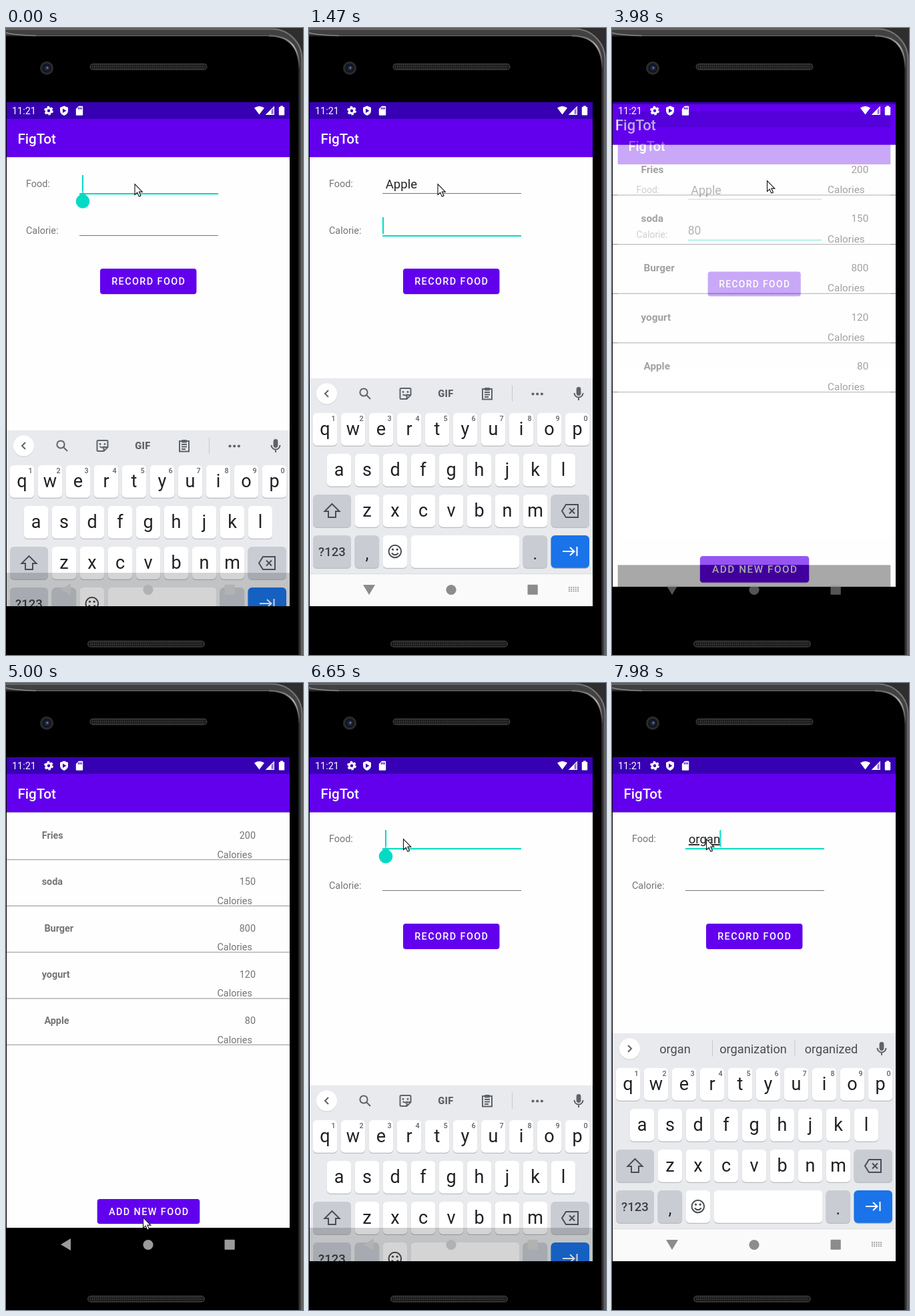
An HTML page for the animation above (8 s loop, 445 by 938 pixels).

```html
<!DOCTYPE html>
<html lang="en">
<head>
<meta charset="utf-8">
<title>Food log</title>
<style>
html, body { margin: 0; width: 100%; height: 100%; overflow: hidden; background: #000; }
svg { display: block; width: 445px; height: 938px; font-family: Roboto, sans-serif; }
.mid { text-anchor: middle; }
.med { font-weight: 500; }
.line { fill: none; stroke: currentColor; stroke-width: 2; }
#food { text-decoration-skip-ink: none; }
</style>
</head>
<body>
<svg id="stage" viewBox="0 0 445 938" xmlns="http://www.w3.org/2000/svg"></svg>
<script>
const LOOP = 8000;
const TEAL = '#03dac5', PURPLE = '#6200ee';

const rect = (x, y, w, h, fill, rx = 0, extra = '') =>
  `<rect x="${x}" y="${y}" width="${w}" height="${h}" fill="${fill}" rx="${rx}" ${extra}/>`;
const text = (x, y, size, fill, str, extra = '') =>
  `<text x="${x}" y="${y}" font-size="${size}" fill="${fill}" ${extra}>${str}</text>`;
const circle = (x, y, r, fill, extra = '') =>
  `<circle cx="${x}" cy="${y}" r="${r}" fill="${fill}" ${extra}/>`;
const path = (d, extra = 'class="line"') => `<path d="${d}" ${extra}/>`;
const at = (x, y, body) => `<g transform="translate(${x} ${y})">${body}</g>`;

function phone() {
  const speaker = (x, y) => rect(x, y, 176, 10, '#3a3a3a', 5) +
    rect(x + 1.5, y + 1.5, 173, 7, '#161616', 3.5) + rect(x + 3, y + 2, 170, 6, 'url(#mesh)', 3);
  return rect(0, 0, 445, 938, '#2e2e2e') +
    rect(-60, 1.5, 503.5, 1000, '#414141', 45, 'stroke="#747474" stroke-width="2"') +
    rect(-60, 11.5, 499, 1000, '#000', 39, 'stroke="#242424" stroke-width="2"') +
    path('M45 11.5H400', 'fill="none" stroke="#777" stroke-width="1"') +
    path('M0 7Q12 11 45 11.5', 'fill="none" stroke="#8a8a8a" stroke-width="1.5"') +
    path('M394 11.500Q439 11.500 439.500 60', 'fill="none" stroke="url(#shine)" stroke-width="2.500"') +
    speaker(125.5, 53) + speaker(122, 916.5) +
    circle(61, 60, 10, '#2b2b2e') + circle(61, 60, 7, '#15161d') +
    circle(61.5, 60, 3.6, '#202c4e') + circle(62, 59.5, 1.2, '#7189b5');
}

// Window backdrop shared by both screens
function page(body) {
  return rect(1, 815, 424, 50, '#000') + rect(1, 111, 424, 25, '#3700b3') +
    rect(1, 136, 424, 57.5, PURPLE) + rect(1, 193.5, 424, 621.5, '#fefefe') +
    text(17.5, 173, 20.6, '#fff', 'FigTot', 'class="med"') + body;
}

function button(x, y, w, h, label, id) {
  return rect(x, y + 1, w, h, '#000', 4, 'opacity=".12"') + rect(x, y, w, h, PURPLE, 4) +
    `<ellipse id="${id}" cx="${x + w / 2}" cy="${y + h / 2}" ry="${h / 2}" fill="#fff"/>` +
    text(x + 17.2, y + h / 2 + 5.2, 14.4, '#fff', label, 'class="med" letter-spacing="1.42"');
}

function form() {
  return page(
    text(30, 238, 14.4, '#757575', 'Food:') + text(30, 307.8, 14.4, '#757575', 'Calorie:') +
    '<rect id="foodLine" x="110" width="208"/><rect id="calLine" x="110" width="208"/>' +
    text(114.8, 240, 18.5, '#212121', '', 'id="food"') +
    text(110, 302.8, 18.1, '#212121', '', 'id="cal"') +
    rect(0, 220, 2, 25, TEAL, 0, 'id="foodCaret"') + rect(0, 283, 2, 25, TEAL, 0, 'id="calCaret"') +
    path('M115 245.2l7.3 7a10.3 10.3 0 1 1-14.6 0z', `id="handle" fill="${TEAL}"`) +
    button(141, 360, 144.4, 38, 'RECORD FOOD', 'ripRecord'));
}

function list() {
  const rows = [['Fries', 200, 0], ['soda', 150, 0], ['Burger', 800, 1], ['yogurt', 120, 0], ['Apple', 80, 1]];
  return page(rows.map(([name, n, pad], i) => at(0, i * 69.25,
    text(53.7 + pad * 3.7, 233, 14.4, '#747474', name, 'font-weight="700"') +
    text(374, 233, 14.4, '#747474', n, 'text-anchor="end"') +
    text(316.5, 261.6, 14.4, '#747474', 'Calories') + rect(1, 263.7, 424, 1.1, '#9a9a9a'))).join('') +
    button(136.7, 771.9, 153.6, 37, 'ADD NEW FOOD', 'ripAdd'));
}

function keyboard() {
  const key = (x, y, w, fill = '#fff') => rect(x, y + 1, w, 49, '#b9bcc1', 6) + rect(x, y, w, 48.7, fill, 6);
  const GREY = '#c9ccd3', INK = '#202124';
  const row = (letters, x0, y, hints) => [...letters].map((c, i) => {
    const x = x0 + i * 42;
    return key(x - 18.3, y, 36.6) + text(x, y + 33, 27, INK, c, 'class="mid"') +
      (hints ? text(x + 12.5, y + 12.2, 10.8, '#5f6368', (i + 1) % 10, 'class="mid med"') : '');
  }).join('');
  const sep = x => rect(x, 535, 1, 24, '#c6c8cc');
  const dots = [0, 1, 2].map(i => circle(335.5 + i * 6.7, 547.5, 2.1, '#5f6368')).join('');
  const tools = at(84, 547, circle(-2, -2, 5.6, 'none', 'class="line"') + path('M2.5 2.5L8 8')) +
    at(144.5, 547, path('M-6.5-8H6.5Q8-8 8-6.5V2L2 8H-6.5Q-8 8-8 6.5V-6.5Q-8-8-6.5-8zM8 2H2V8M-4 1Q-1 4 3 1') +
      circle(-3.5, -2.5, 1.4, '#5f6368') + circle(3.5, -2.5, 1.4, '#5f6368')) +
    text(205, 552.3, 14.5, '#5f6368', 'GIF', 'class="mid" font-weight="900" letter-spacing=".4"') +
    at(267, 547, path('M-7-7H7V8.5H-7zM-4-2H4M-4 1.5H4M-4 5H2') + rect(-4, -9, 8, 4.5, '#5f6368', 1)) +
    sep(304) + dots;
  const words = [94.5, 211.5, 328.5].map(x => text(x, 554, 18.2, '#4a4d52', '', 'class="mid word"')).join('') +
    sep(150) + sep(273.5);
  let pad = '';
  for (let i = 0; i < 15; i++) pad += rect(389 + i % 5 * 3.3, 836 + Math.floor(i / 5) * 2.8, 1.8, 1.6, '#8c8c8c');
  return rect(1, 524, 424, 341, '#e8eaed') + rect(1, 816, 424, 49, '#fafafa') + rect(1, 816, 424, 1.2, '#dcdee0') +
    `<g color="#5f6368"><g id="tools">${tools}</g><g id="words">${words}</g>` +
    circle(26.5, 548, 15.8, '#d3d5d8') + circle(26.5, 547, 15.6, '#fff') +
    at(26.5, 547, path('M2.5-5L-2.5 0L2.5 5', 'id="chev" class="line"')) +
    at(404, 547, rect(-3.4, -10, 6.8, 13, '#5f6368', 3.4) + path('M-6.5-1a6.5 6.5 0 0 0 13 0M0 5.5V10')) + '</g>' +
    row('qwertyuiop', 24, 576, true) + row('asdfghjkl', 45, 637) + row('zxcvbnm', 87, 698) +
    key(6, 698, 57, GREY) + key(362.5, 698, 57.5, GREY) + key(6, 759, 57, GREY) + key(68.5, 759, 36.6, GREY) +
    key(110.5, 759, 36.6) + key(152.5, 759, 163) + key(320.5, 759, 36.6, GREY) + key(362.5, 759, 57.5, '#1a73e8') +
    '<g color="#4a4d52">' + at(34.5, 722, path('M0-10L11 1H5.5V10H-5.5V1H-11z')) +
    at(391, 722.5, path('M-6-9.5H12V9.5H-6L-12 0zM-1-4L7 4M7-4L-1 4')) +
    at(128.8, 783, circle(0, 0, 9.3, 'none', 'class="line"') + path('M-5 2.5Q0 8 5 2.5') +
      circle(-3.3, -2.8, 1.6, '#4a4d52') + circle(3.3, -2.8, 1.6, '#4a4d52')) + '</g>' +
    at(391, 783, `<g color="#fff">${path('M-11 0H6M0-6L6.5 0L0 6M10.5-7V7')}</g>`) +
    text(34.5, 789.8, 18.6, '#3c4043', '?123', 'class="mid med"') +
    text(87, 795, 25, INK, ',', 'class="mid"') + text(338.8, 795, 25, INK, '.', 'class="mid"') + pad;
}

function status() {
  return text(9, 129.2, 14.4, '#fff', '11:21') + '<g fill="#fff" color="#fff">' +
    at(64, 123.7, circle(0, 0, 3.8, 'none', 'stroke="#fff" stroke-width="3.2"') +
      circle(0, 0, 5.7, 'none', 'stroke="#fff" stroke-width="2.4" stroke-dasharray="3.2 2.77"')) +
    at(87, 123.7, path('M0-7.2L6-4.8V0Q6 5 0 7.4Q-6 5-6 0V-4.8z', '') +
      path('M-2-3.2L3.4 0L-2 3.2z', 'fill="#3700b3"')) +
    at(110, 123.7, path('M-1-7H4Q5.2-7 5.2-6V6Q5.2 7 4 7H-4Q-5.2 7-5.2 6V-2.8z', '') +
      [-1.6, .7, 3].map(x => rect(x - .6, -5, 1.3, 3, '#3700b3')).join('')) +
    path('M372 119.6Q379.5 114.5 387 119.6L379.5 129.5z', '') +
    path('M402 117V130H389z', 'opacity=".45"') + path('M397.5 121.5V130H389z', '') +
    path('M401.3 118.2V129.3H390.5z', 'fill="none" stroke="#fff" stroke-width="1.2"') +
    rect(408.8, 118, 8.4, 12.5, '#fff', 1) + rect(411, 116.5, 4, 2, '#fff') + '</g>';
}

function nav() {
  return at(90, 840, path('M-8 0L7-9V9z', 'id="back"')) + '<circle cx="213" cy="840.5" r="7.6"/>' +
    '<rect x="327.5" y="832.8" width="15.3" height="15" rx="1"/>';
}

const stage = document.getElementById('stage');
stage.innerHTML = `<defs>
  <clipPath id="screen"><rect x="1" y="111" width="424" height="754"/></clipPath>
  <pattern id="mesh" width="3" height="3" patternUnits="userSpaceOnUse"><circle cx="1" cy="1" r=".9" fill="#484848"/></pattern>
  <linearGradient id="shine" x2="0" y2="1"><stop stop-color="#666"/><stop offset=".3" stop-color="#aaa"/><stop offset="1" stop-color="#333"/></linearGradient>
</defs>${phone()}<g clip-path="url(#screen)">${rect(1, 111, 424, 754, '#000')}<g id="list">${list()}</g><g id="form">${form()}</g>
<g id="keys">${keyboard()}</g>${rect(1, 815, 424, 50, '#000', 0, 'id="shade"')}${status()}<g id="nav">${nav()}</g></g>
<path id="mouse" d="M0 0V16L3.7 12.6L6.3 18.6L9 17.5L6.4 11.6H11.3z" fill="#fff" stroke="#111" stroke-width="1.1"/>`;

const el = {};
stage.querySelectorAll('[id]').forEach(n => el[n.id] = n);
const words = [...stage.querySelectorAll('.word')];
const show = (n, on) => n.style.display = on ? '' : 'none';
const set = (n, attrs) => Object.entries(attrs).forEach(([k, v]) => n.setAttribute(k, v));
const clamp = v => Math.min(1, Math.max(0, v));

// The picture is refreshed in bursts: first time, last time, count
const BURSTS = [[120, 1030, 8], [1320, 1470, 2], [1840, 1840, 1], [2240, 2490, 2], [2920, 3850, 8],
  [3980, 5000, 9], [5120, 6110, 8], [6260, 7300, 9], [7430, 7980, 5]];
const ticks = [0];
for (const [a, b, n] of BURSTS)
  for (let i = 0; i < n; i++) ticks.push(n > 1 ? a + (b - a) * i / (n - 1) : a);
const snap = t => ticks.filter(k => k <= t + 12).pop();

function keyed(t, keys) {
  if (t <= keys[0][0]) return keys[0].slice(1);
  for (let i = 1; i < keys.length; i++) {
    const [a, b] = [keys[i - 1], keys[i]];
    if (t <= b[0]) return b.slice(1).map((v, j) => a[j + 1] + (v - a[j + 1]) * (t - a[0]) / (b[0] - a[0]));
  }
  return keys[keys.length - 1].slice(1);
}

// Fast out, extra slow in: two joined cubic curves
function glide(x) {
  x = clamp(x);
  const cubic = (u, a, b, c, d) => a * (1 - u) ** 3 + 3 * b * u * (1 - u) ** 2 + 3 * c * u * u * (1 - u) + d * u ** 3;
  const [cx, cy] = x < 1 / 6 ? [[0, .05, .1333, 1 / 6], [0, 0, .06, .4]] : [[1 / 6, .2083, .25, 1], [.4, .82, 1, 1]];
  let lo = 0, hi = 1;
  for (let i = 0; i < 24; i++) {
    const m = (lo + hi) / 2;
    if (cubic(m, ...cx) < x) lo = m; else hi = m;
  }
  return cubic(lo, ...cy);
}

const typed = (word, t, start, gap) => word.slice(0, Math.max(0, Math.floor((t - start) / gap) + 1));
const HINTS = {
  A: 'A And Also', Ap: 'A And Also', App: 'App Apps Apple', Appl: 'Appl Apple Apply', Apple: 'Apple Apples Appleseed',
  o: 'o of on', or: 'or orange order', org: 'org organic organize', orga: 'orga organic organized',
  organ: 'organ organization organized'
};
const MOUSE = [[2490, 193, 233.5], [2920, 200.5, 254.5], [3186, 232, 372], [3718, 233, 372], [3980, 232.5, 228.5],
  [4360, 232.5, 236], [4870, 206, 800], [5403, 204, 798], [5685, 115.5, 319.5], [5969, 136, 246], [6110, 141.5, 233.5]];
const CLOSE = 3915, OPEN = 5440;
const zoom = s => `translate(213 488) scale(${s}) translate(-213 -488)`;

function ripple(n, t, start) {
  const p = clamp((t - start) / 260), half = n === el.ripRecord ? 72 : 76;
  set(n, { rx: half * p, opacity: t < start ? 0 : .24 * (1 - clamp((t - start - 250) / 250)) });
}

function draw(time) {
  const t = snap(time), second = t > 5000;

  // Screen changes
  const age = t - (second ? OPEN : CLOSE);
  const p = glide(age / 400);
  set(el.list, {
    transform: zoom(second ? 1 + .05 * p : 1.1 - .1 * p),
    opacity: second ? 1 - .8 * clamp(age / 250) : 1
  });
  set(el.form, {
    transform: zoom(second ? .85 + .15 * p : 1 - .1 * p),
    opacity: second ? clamp((age - 35) / 50) : 1 - clamp((age - 35) / 45)
  });
  ripple(el.ripRecord, t, 3440);
  ripple(el.ripAdd, t, 5110);

  // Fields
  const food = second ? typed('organ', t, 7425, 137) : typed('Apple', t, 500, 130);
  const cal = second ? '' : t >= 2485 ? '80' : t >= 2235 ? '8' : '';
  const onFood = t < 1320 || t >= 6255, onCal = t >= 1320 && !second;
  el.food.textContent = food;
  el.cal.textContent = cal;
  el.food.setAttribute('text-decoration', onFood && food ? 'underline' : 'none');
  set(el.foodLine, onFood ? { y: 247, height: 2, fill: TEAL } : { y: 247, height: 1, fill: '#757575' });
  set(el.calLine, onCal ? { y: 310, height: 2, fill: TEAL } : { y: 310, height: 1, fill: '#757575' });
  set(el.foodCaret, { x: 114 + (food ? el.food.getComputedTextLength() : 0) });
  set(el.calCaret, { x: 110 + (cal ? el.cal.getComputedTextLength() : 0) });
  show(el.foodCaret, onFood);
  show(el.calCaret, onCal && (t < 1840 || t >= 2235 && t < 2915 || t >= 3440 && t < CLOSE));
  show(el.handle, onFood && !food);

  // Keyboard and navigation bar
  const up = t < CLOSE || t >= 6385, s = second ? t - 6650 : t;
  const [drop] = keyed(s, [[-260, 341], [-130, 250], [0, 78], [125, 10], [250, 0]]);
  const hints = t < 1465 || second ? HINTS[food] : '';
  show(el.keys, up);
  set(el.keys, { transform: `translate(0 ${drop})` });
  set(el.shade, { opacity: up ? clamp(drop / 459) : 0 });
  show(el.tools, !hints);
  show(el.words, hints);
  if (hints) hints.split(' ').forEach((w, i) => words[i].textContent = w);
  set(el.chev, { transform: hints ? 'scale(-1 1)' : '' });
  const [turn] = t >= CLOSE && t < 6000 ? keyed(t, [[3980, -90], [4240, 0]]) : keyed(s, [[125, 0], [380, -90]]);
  set(el.back, { transform: `rotate(${turn})` });
  set(el.nav, {
    fill: !up ? '#9a9a9a' : drop > 40 ? '#b2b2b2' : '#8c8c8c',
    opacity: !up && t >= CLOSE && t < 4060 ? .55 : 1
  });

  const [mx, my] = keyed(t, MOUSE);
  set(el.mouse, { transform: `translate(${mx} ${my})` });
}

const t0 = performance.now();
function loop() {
  draw((performance.now() - t0) % LOOP);
  requestAnimationFrame(loop);
}
loop();
</script>
</body>
</html>
```
